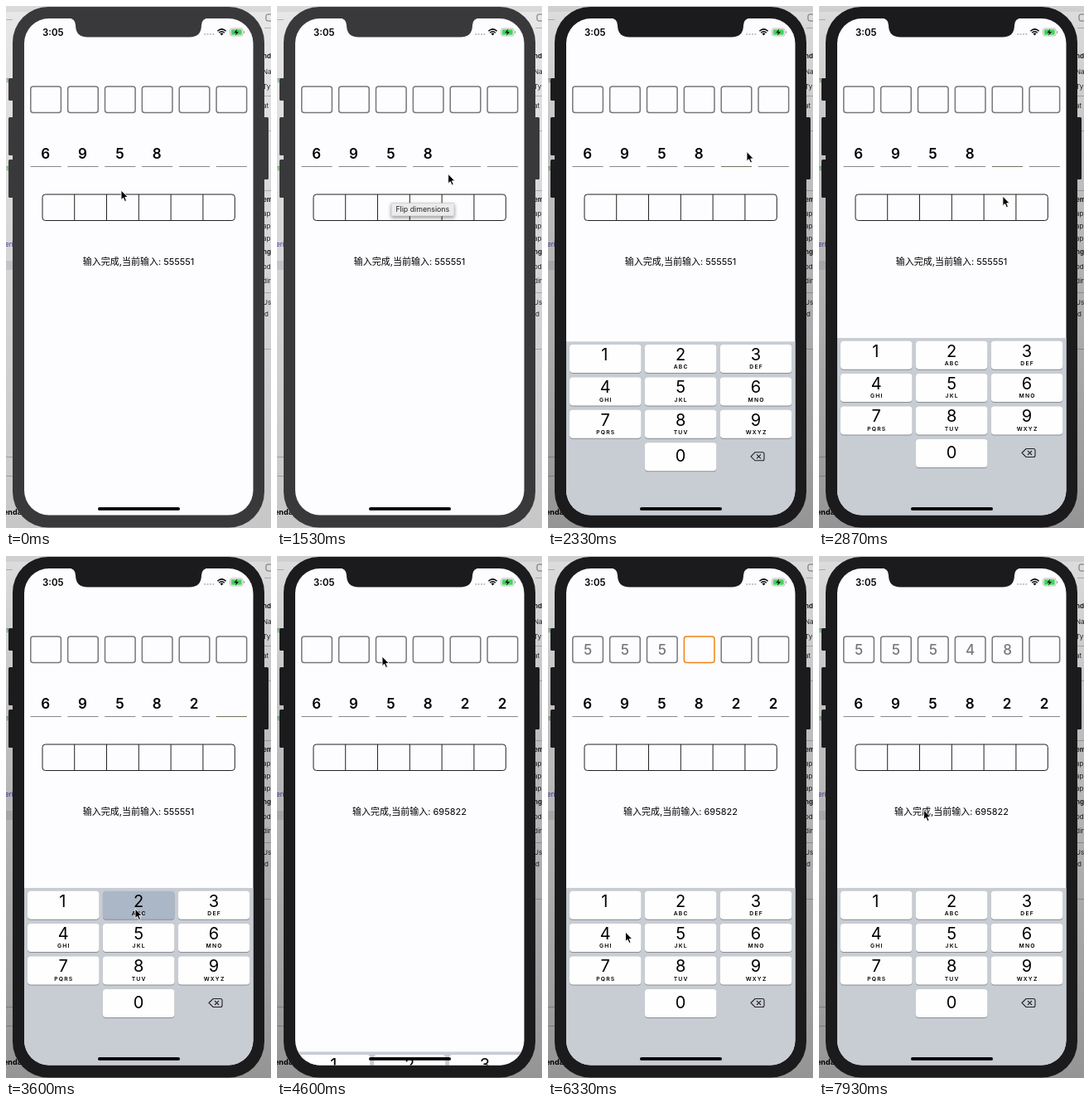
Recreate the animation shown at these times as an HTML page. Size 320 px wide and 629 px high, loop 8000 ms.

```html
<!DOCTYPE html>
<html lang="zh">
<head>
<meta charset="utf-8">
<title>Code input</title>
<style>
html, body { margin: 0; width: 100%; height: 100%; overflow: hidden; background: #eee; }
svg { display: block; width: 320px; height: 629px; font-family: Inter, "Noto Sans CJK SC", "Noto Sans CJK", sans-serif; }
.mid { text-anchor: middle; }
.body { fill: #39393b; }
.active .body { fill: #1b1b1d; }
.shade { opacity: .45; }
.active .shade { opacity: 1; }
.line { fill: none; stroke: #77777b; }
.side { font-size: 8px; fill: #222; }
.bold { font-weight: 700; }
</style>
</head>
<body>
<svg id="stage" viewBox="0 0 320 629"></svg>
<script>
const stage = document.getElementById('stage');
const range = n => [...Array(n).keys()];
const rect = (x, y, w, h, r, attrs) =>
  `<rect x="${x}" y="${y}" width="${w}" height="${h}" rx="${r}" ${attrs}/>`;
const text = (x, y, size, str, attrs = '') =>
  `<text x="${x}" y="${y}" font-size="${size}" ${attrs}>${str}</text>`;
const rule = (y, x, w = 8) => rect(x, y, w, 1, 0, 'fill="#bbb"');
const cellX = i => 29.8 + 44.85 * i;

function backdrop() {
  const labels = [['nd', 63, 1], ['Na', 82], ['Ty', 100], ['at', 123], ['em', 236, 1], ['apl', 253], ['apl', 268],
    ['apl', 283], ['ng', 299, 1], ['od', 317], ['dir', 334], ['Us', 360], ['id', 374]];
  return rect(0, 0, 320, 629, 0, 'fill="#f0f0f1"') +
    rect(0, 0, 320, 7, 0, 'fill="#e2e2e3"') +
    [16, 543, 566].map(y => rule(y, 0)).join('') +
    [26, 108, 150, 222, 345, 413].map(y => rule(y, 312)).join('') +
    rect(0, 307, 8, 11, 0, 'fill="#dcdce0"') +
    rect(314, 10, 8, 8, 2, 'class="line"') +
    text(0, 92, 8, 's', 'fill="#2a8a2a"') + text(0, 198, 8, 's', 'fill="#2a8a2a"') +
    text(-1, 290, 8, 'eri', 'fill="#5a35a8"') +
    text(-3, 613, 9, 'enda', 'class="bold"') +
    labels.map(([s, y, b]) => text(310, y, 8, s, `class="side ${b ? 'bold' : ''}"`)).join('') +
    rect(0, 0, 320, 629, 0, 'fill="url(#shade)" class="shade"');
}

function phone() {
  const buttons = [[3, 87, 27], [3, 134, 46], [3, 185, 46], [311, 134, 75]];
  return buttons.map(([x, y, h]) => rect(x, y, 6, h, 1.5, 'class="body"')).join('') +
    rect(8, 1, 304, 627.5, 43, 'class="body"') +
    rect(22, 15, 276.5, 598.5, 30, 'fill="#fdfcfe"');
}

function statusBar() {
  return '<path class="body" d="M74 14H246q-10 1-10 9q0 14.500-14.500 14.500H98.500q-14.500 0-14.500-14.500q0-8-10-9z"/>' +
    text(44, 35.500, 11.4, '3:05', 'font-weight="600"') +
    range(4).map(i => `<circle cx="${240.2 + 3.4 * i}" cy="34" r="1.1" fill="#bbb"/>`).join('') +
    '<path d="M260.500 35.500l-2-2.200q2-1.600 4 0z"/>' +
    '<path d="M255.400 30.200q5.100-4.600 10.200 0M257.200 32.200q3.300-2.900 6.600 0" fill="none" stroke="#000" stroke-width="1.5"/>' +
    rect(270.5, 27, 15.5, 9, 2.4, 'fill="#fff" stroke="#aaa" stroke-width=".8"') +
    rect(271.8, 28.3, 12.9, 6.4, 1.3, 'fill="#45d35c"') +
    rect(287, 30, 1.2, 3, .6, 'fill="#aaa"') +
    '<path d="M279.200 27.600l-4 4.600h2.800l-1 3.500l4-4.700h-2.800z" fill="#111"/>';
}

function form() {
  return range(6).map(i => {
    const x = cellX(i), mid = x + 18.3;
    return rect(x, 97, 36.6, 31.6, 3, 'class="line box" stroke-width="1.5"') +
      text(mid, 119.3, 17, '', 'class="mid code" fill="#77777b" font-weight="500"') +
      rect(x - .3, 193, 37.2, 1, 0, 'class="under" fill="#88888b"') +
      text(mid - .4, 184, 17, '', 'class="mid digit" font-weight="600"');
  }).join('') +
    rect(47.3, 107, 1.4, 12, .6, 'id="caret" fill="#ee8419"') +
    rect(44, 227, 232.3, 31.5, 3.5, 'fill="none" stroke="#222"') +
    range(5).map(i => rect(82.2 + 38.8 * i, 227, 1, 31.5, 0, 'fill="#222"')).join('') +
    text(160, 312, 11, '', 'id="label" class="mid"');
}

function keyboard() {
  const letters = ['', 'ABC', 'DEF', 'GHI', 'JKL', 'MNO', 'PQRS', 'TUV', 'WXYZ'];
  const key = (n, col, row) => {
    const x = 26 + 90.9 * col, y = 403.7 + 39.4 * row, mid = x + 43.2;
    return rect(x, y + 1, 86.5, 34, 4, 'fill="#8b8e94"') +
      rect(x, y, 86.5, 34, 4, `id="key${n}" fill="#fefefe"`) +
      text(n === 1 ? mid - 1 : mid, y + (n ? 18.8 : 23.2), 20, n, 'class="mid"') +
      text(mid + .6, y + 29.2, 6.8, letters[n - 1] || '', 'class="mid" font-weight="600" letter-spacing="1.2"');
  };
  return '<g clip-path="url(#screen)"><g id="keyboard">' +
    rect(22, 400, 277, 230, 0, 'fill="#c8ccd3"') +
    range(9).map(i => key(i + 1, i % 3, i / 3 | 0)).join('') + key(0, 1, 3) +
    '<path d="M245 538.500l5-5h9q2 0 2 2v6q0 2-2 2h-9zM252 536l5 5m0-5l-5 5" fill="none" stroke="#222" stroke-width="1.1"/>' +
    '</g></g>' + rect(111, 604, 99, 3.8, 1.9, '');
}

function pointer() {
  return '<g id="tip">' +
    rect(138, 237.5, 76, 15.5, 1, 'fill="#ebebeb" stroke="#c4c4c4" stroke-width=".6" style="filter:drop-shadow(0 2px 2px #0006)"') +
    text(175.8, 248.3, 8.8, 'Flip dimensions', 'class="mid" fill="#222"') + '</g>' +
    '<path id="cursor" d="M0 0V11.600L2.600 9.200L4.500 13.500L6.500 12.600L4.700 8.500H8.300Z" stroke="#fff" stroke-width=".9"/>';
}

stage.innerHTML = `<defs>
  <linearGradient id="shade" x2="0" y2="1">
    <stop stop-opacity=".08"/><stop offset=".3" stop-opacity=".2"/><stop offset="1" stop-opacity=".38"/>
  </linearGradient>
  <clipPath id="screen">${rect(22, 15, 276.5, 598.5, 30, '')}</clipPath></defs>` +
  backdrop() + phone() + statusBar() + form() + keyboard() + pointer();

const all = sel => [...stage.querySelectorAll(sel)];
const id = name => document.getElementById(name);
const boxes = all('.box'), codes = all('.code'), digits = all('.digit'), unders = all('.under');
const board = id('keyboard'), caret = id('caret'), label = id('label'), tip = id('tip'), cursor = id('cursor');

// [time, x, y] of the pointer
const path = [[0, 139, 222], [730, 139, 222], [1070, 171, 312], [1270, 171, 312], [1530, 206.5, 202.5], [1730, 240, 175.5],
  [2800, 240, 175.5], [3130, 156, 425], [3900, 156, 425], [4200, 131, 125], [4270, 131, 125], [4330, 127, 121],
  [4650, 127, 121], [5000, 109.5, 420], [5270, 158, 462], [6130, 158, 462], [6330, 93.5, 453], [6470, 93.5, 453],
  [6670, 130, 484], [6950, 130, 484], [7470, 125.5, 241], [7870, 125.5, 241], [7930, 126.5, 306], [8000, 126.5, 306]];
const codeTimes = [5560, 5800, 6050, 6480, 6950];
const digitTimes = [0, 0, 0, 0, 3470, 3800];
const presses = { 2: [[3430, 3670], [3770, 3880]], 5: [[5530, 5640], [5770, 5880], [6020, 6130]] };
const count = (times, t) => times.filter(s => t >= s).length;

// Share of a critically damped move still left after a start time
function left(t, start) {
  const k = Math.max(0, t - start) * .0176;
  return (1 + k) * Math.exp(-k);
}

function pointerAt(t) {
  const i = path.findIndex(p => p[0] > t);
  const [t0, x0, y0] = path[i - 1], [t1, x1, y1] = path[i];
  const f = (t - t0) / (t1 - t0);
  return [x0 + (x1 - x0) * f, y0 + (y1 - y0) * f];
}

function draw(t) {
  stage.setAttribute('class', t >= 1930 ? 'active' : '');
  tip.style.opacity = t < 100 ? 0 : t < 1930 ? 1 : Math.max(0, 1 - (t - 1930) / 150);
  cursor.setAttribute('transform', `translate(${pointerAt(t)})`);

  const hidden = t < 3800 ? left(t, 2000) : t < 4575 ? 1 - left(t, 3800) : left(t, 4575);
  board.setAttribute('transform', `translate(0 ${214 * hidden})`);
  for (const n in presses) {
    const down = presses[n].some(([a, b]) => t >= a && t < b);
    id('key' + n).setAttribute('fill', down ? '#abb7c7' : '#fefefe');
  }

  const typed = count(codeTimes, t), entered = count(digitTimes, t);
  const focus = t >= 4620 && t < 7730 ? typed : -1;
  range(6).forEach(i => {
    codes[i].textContent = i < typed ? '55548'[i] : '';
    digits[i].textContent = i < entered ? '695822'[i] : '';
    boxes[i].style.stroke = i === focus ? '#ee8419' : '';
    unders[i].style.fill = i === entered && t >= 2000 ? '#77725f' : '';
  });
  caret.style.opacity = t < 4620 || t > 5270 ? 0 : Math.min(1, (5270 - t) / 350);
  label.textContent = '输入完成,当前输入: ' + (entered < 6 ? '555551' : '695822');
}

function loop() {
  draw(performance.now() % 8000);
  requestAnimationFrame(loop);
}
loop();
</script>
</body>
</html>
```
